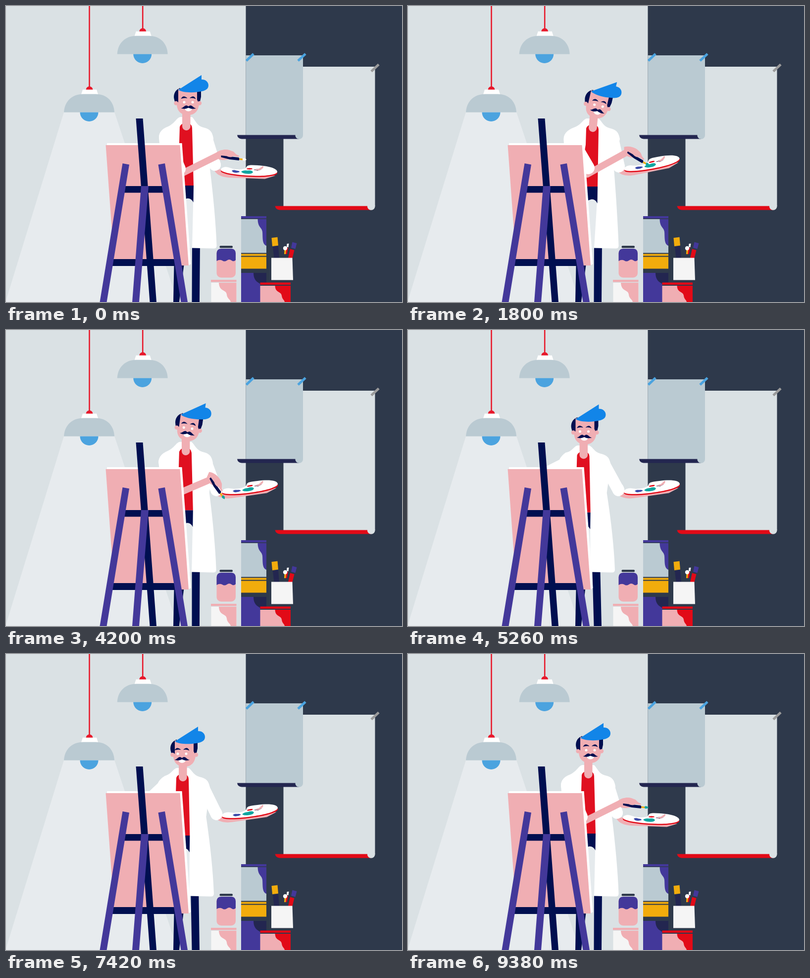
An HTML page for the animation above (9.4 s loop, 800 by 600 pixels).

```html
<!DOCTYPE html>
<html lang="en">
<head>
<meta charset="utf-8">
<title>Painter in the studio</title>
<style>
  html, body { margin: 0; width: 100%; height: 100%; overflow: hidden; background: #dae1e4; }
  svg { display: block; width: 100vw; height: 100vh; }
  .wall { fill: #dae1e4 } .slate { fill: #2e394b } .steel { fill: #bacad2 }
  .navy { fill: #000f50 } .ink { fill: #232650 } .purple { fill: #43389a }
  .pink { fill: #f0aeb3 } .red { fill: #e20a17 } .shirt { fill: #e01020 }
  .white { fill: #fff } .paper { fill: #f5f5f5 } .yellow { fill: #f2ac0c }
  .sky { fill: #4ba3df } .beret { fill: #1285e8 } .teal { fill: #10a5a0 }
  .sleeve { stroke: #fff; stroke-linecap: round; fill: none }
  .skin { stroke: #f0aeb3; stroke-linecap: round; fill: none }
  .tape { stroke-width: 5; fill: none }
</style>
</head>
<body>
<svg viewBox="0 0 800 600" preserveAspectRatio="none">
  <defs>
    <g id="lamp">
      <path d="M168.5 -120V165" stroke="#e7182b" stroke-width="2.6"/>
      <path fill="#e7182b" d="M161.5 170a7 7 0 0 1 14 0z"/>
      <path class="white" d="M155 169.5H183L186 179H152z"/>
      <path class="steel" d="M117 215.5C118 193 134 178.500 156 178.5H181C203 178.5 218 193 219 215.5z"/>
      <path class="sky" d="M149.5 215.5a18.5 18.5 0 0 0 37 0z"/>
    </g>
    <path id="plate" d="M434 332C434 328 442 325 449 327C462 332 477 333 485 328C487 323 490 322.5 497 322.5C530 323 548 329 548 336C548 342 525 345 500 344C460 343 434 337 434 332z"/>
  </defs>

  <!-- room -->
  <path class="wall" d="M0 0H800V600H0z"/>
  <path class="slate" d="M484.5 0H800V600H484.5z"/>
  <path fill="#e7ebee" d="M117 215H219L347 600H-1z"/>
  <use href="#lamp"/>
  <use href="#lamp" x="107.7" y="-118"/>

  <path class="wall" d="M560.5 123H745.5V406H560.5z"/>
  <path class="red" d="M543.5 405.5H738V413.5H553Q545 413 543.5 405.5z"/>
  <circle class="wall" cx="737.7" cy="406" r="7.8"/>
  <path class="steel" d="M484.5 100H600V262H484.5z"/>
  <path class="ink" d="M467 261.5H592V269.5H476Q468 269 467 261.5z"/>
  <circle class="steel" cx="592.2" cy="262" r="7.8"/>
  <path class="tape" stroke="#4ba3df" d="M485.5 111L500 97M590 111L605 97"/>
  <path class="tape" stroke="#9b9b9b" d="M738 132.5L753 118.5"/>

  <!-- painter -->
  <path id="legs" class="navy"/>
  <path id="coat" class="white"/>
  <path id="gap" fill="#e5eaed"/>
  <path id="pants" class="navy"/>
  <path id="shirt" class="shirt"/>
  <path id="neck" class="skin" stroke-width="16.5"/>
  <g id="head">
    <path class="navy" d="M352 166C341 170 338 180 339.5 188L342 198L350 197zM384 170H394V184L391 198L384 192z"/>
    <circle class="pink" cx="343.5" cy="197" r="4.2"/>
    <circle class="pink" cx="391" cy="197" r="4.2"/>
    <path class="pink" d="M348 168H386V190L390 198C389 214 380 221 368 221C354 221 346 214 345 200L348 194z"/>
    <g id="face">
      <path class="navy" d="M353.5 188Q358 179 366.5 187Q360 185.5 353.5 188zM371 187Q379 179 383.5 188.5Q377 185.5 371 187z"/>
      <circle class="white" cx="360" cy="195" r="2.5"/>
      <circle class="white" cx="377" cy="195" r="2.5"/>
      <path class="white" d="M361 207H376.5Q375 213.5 368.5 213.5Q362 213.5 361 207z"/>
      <path class="navy" d="M353.5 207C358 207 360 201.5 365 201.5L368.5 203.5L372 201.5C377 201.5 379 207 384 207.5C378 209.5 372 208.5 368.5 206C365 208.5 359 209.5 353.5 207z"/>
    </g>
    <path class="beret" d="M395 140L348 170C356 175 372 176 385 174.5C400 173 409 170 409 161C409 153 402 148.5 395 149z"/>
  </g>
  <path id="sleeveR" class="sleeve" stroke-width="24"/>
  <path id="under" class="pink" d="M421 333C425 343 440 348 455 348L523 350.5L544 344L500 338L434 331z"/>
  <path id="cuffR" class="sleeve" stroke-width="24"/>
  <g id="palette">
    <use href="#plate" y="2.5" class="red"/>
    <use href="#plate" class="white"/>
    <ellipse class="red" cx="492" cy="330" rx="6" ry="1.5"/>
    <path fill="#3a49a8" d="M456 334Q460 331.5 465 333.5Q472 334 472 336.5Q466 339 459 337z"/>
    <path class="teal" d="M475 336Q479 332.5 487 333.5Q498 332 499 337Q496 341 487 340Q479 340 475 336z"/>
    <path class="ink" d="M500 332L507 330.5L516 331.5L508 334z"/>
    <path class="pink" d="M502 331.5C510 331 514 328 518 325C522 324 520 329 516 331C511 334 505 334 502 331.5z"/>
  </g>
  <path id="forearm" class="skin" stroke-width="13.5"/>
  <path id="sleeveL" class="sleeve" stroke-width="26"/>
  <g id="hand">
    <path class="pink" d="M424 298C432 291 444 290 451 292L459 295C463 298 464 301 470 303C473 305 470 307 465 305L457 304C452 312 442 314 430 311z"/>
    <path class="navy" d="M434.5 303L452 305L470 307Q473 310 470.5 313L452 311L434.5 306.5z"/>
    <path class="yellow" d="M471.5 308.5L478.5 309.5L478 312.5L471.5 312z"/>
    <path id="tip" d="M478 309Q482 306.5 486 311.5Q481 315 478 312.5z"/>
    <path class="pink" d="M447 300L459 300Q462 304 456 306Q449 307 445 303z"/>
  </g>

  <!-- easel -->
  <path class="white" d="M204 278H355.5L373.5 523L368 526L219 520z"/>
  <path class="pink" d="M201.5 282H351.5L369 526H219z"/>
  <path class="navy" d="M238 365H320V378.5H238zM212 513H345V527H212zM262.5 228H276.5L304 600H290.5z"/>
  <path class="purple" d="M235.5 319L249 321.5L203.5 600H189.5zM307.5 321.5L321 319L367 600H353.5zM273 365H288L269 600H255z"/>

  <!-- cans and jar -->
  <rect class="slate" x="431.5" y="486" width="26.5" height="4.5" rx="2"/>
  <rect class="pink" x="425.5" y="492" width="38.5" height="58.5" rx="9"/>
  <path class="purple" d="M425.5 501Q426 492 435 492H455Q463.5 492 464 501V515Q460 519 456 516Q451 512 446 516Q441 519 437 516Q431 513 425.5 517z"/>
  <path class="pink" d="M414 555H465.5V559.5H414z"/>
  <path class="paper" d="M414.5 561H465.5V600H414.5z"/>
  <path class="pink" d="M430 561H465.5V600H454C453 594 447 594 446 585C445 574 431 580 430 561z"/>

  <path class="slate" d="M475 426H526V600H475z"/>
  <path class="purple" d="M475 426H526V430.5H475zM475 541H514V600H475z"/>
  <path class="steel" d="M475 432H526V500.5H475z"/>
  <path class="purple" d="M508.5 432H526V486C517 482 519 470 518 458C517 448 509 450 508.5 432z"/>
  <path class="yellow" d="M475 502.5H526V506.5H475zM475 508.5H526V532.5H475z"/>
  <path class="ink" d="M500 541H526V564H514C510 560 500 558 500 541z"/>
  <path class="red" d="M513.5 560.5H575V565H513.5z"/>
  <path class="slate" d="M513.5 565H575V567H513.5z"/>
  <path class="pink" d="M513.5 567H575V600H513.5z"/>
  <path class="red" d="M543.5 567H575V600H563C562 595 558 595 557 587C556 578 544 582 543.5 567z"/>

  <path class="yellow" d="M536.5 470L548.5 468.5L550 485.5L538 487z"/>
  <path class="ink" d="M539 488L550 486.5L552 511H541.5z"/>
  <path class="white" d="M567.5 482L571.5 481.5L570.5 489L567 488.5z"/>
  <path class="red" d="M566 490H570L567.5 503H564zM574 492.5L582.5 495L578.5 511H570z"/>
  <path class="yellow" d="M562.5 494H566L565 503H562z"/>
  <circle class="white" cx="564" cy="491" r="4.2"/>
  <path class="purple" d="M578.5 478.5L587.5 481L584.5 492.5L576 490z"/>
  <path class="paper" d="M536 510.5H578.5L580 555.5H536z"/>
</svg>

<script>
const LOOP = 9400;
const part = id => document.getElementById(id);
const draw = (id, d) => part(id).setAttribute('d', d);
const place = (id, v) => part(id).setAttribute('transform', v);

// x, y: shoulders; look, nod: head shift and rotation; face: features' shift;
// tilt: palette angle; cuff, hand, grip: painting arm; stir: brush swing.
const rest = { x: 0, y: 0, look: 0, nod: 0, face: 0, tilt: 0,
  cuffX: 350, cuffY: 330, handX: 445, handY: 302, grip: 0, stir: 0 };
const mix = { x: 9, y: 3, look: 6.5, nod: 13, face: 1, tilt: -13.5,
  cuffX: 364, cuffY: 328, handX: 454, handY: 298, grip: 24, stir: 1 };
const dab = { ...mix, x: 1, y: 0, look: 3, nod: 10, face: -2, tilt: -10.5,
  cuffX: 366, cuffY: 325, handX: 461, grip: 25 };
const paint = { ...rest, x: -9.5, y: 9, face: -3, tilt: -10.5,
  cuffX: 261, cuffY: 300, handX: 270, handY: 340, grip: 140 };
const retouch = { ...paint, x: -7, y: 6, face: -6, cuffX: 275, cuffY: 310 };
const lean = { ...retouch, x: 13, tilt: -17.5, cuffX: 300, cuffY: 325, handX: 312, grip: 100 };

const timeline = [
  [0, rest], [120, rest], [940, mix], [1950, mix], [3200, dab], [3800, dab],
  [5200, paint], [5700, paint], [6900, retouch], [7420, retouch],
  [8100, lean], [8250, lean], [9150, rest], [LOOP, rest]
];

const ease = k => k * k * (3 - 2 * k);

function poseAt(t) {
  const i = timeline.findIndex(([time]) => time > t);
  const [t0, a] = timeline[i - 1], [t1, b] = timeline[i];
  const k = ease((t - t0) / (t1 - t0));
  return Object.fromEntries(Object.keys(a).map(key => [key, a[key] + (b[key] - a[key]) * k]));
}

function render(t) {
  const { x, y, look, nod, face, tilt, cuffX, cuffY, handX, handY, grip, stir } = poseAt(t);

  // The lower body trails the shoulders.
  const hem = Math.min(0, x * .8);
  const waist = x * .45 + hem * .8;
  const belt = 364 + y * .65;
  const p = (a, b) => `${a + x} ${b + y} `;
  const s = (a, b) => `${a + x} ${b + y * .5} `;

  draw('legs', `M${360 + waist} 380L${376 + hem / 2} 395L350 600H338L340 500z
    M${376 + hem / 2} 480H${392 + hem / 2}L391 600H375.5z`);
  draw('coat', `M${p(352, 225)}C${p(344, 227)}${p(342, 237)}${s(328, 244)}
    Q${308 + x * .6} ${251 + y} ${309 + x * .6} ${268 + y}L330 480L${376 + hem} 490.5
    L${419 + hem} 491.5Q${426 + hem} 492 ${425.5 + hem} 485
    Q${423 + hem} 420 ${412 + waist} 330L${s(419, 268)}C${s(416, 252)}${s(410, 249)}${s(398, 246)}
    C${s(386, 243)}${s(384, 234)}${p(376, 225)}z`);
  draw('gap', `M340 ${belt + 20}H${378.5 + waist}L${376 + hem} 491H340z`);
  draw('pants', `M345 ${belt}H${379 + waist}L${378.5 + waist} ${belt + 34}
    Q${374 + waist} ${belt + 25} ${366 + waist} ${belt + 26}L345 ${belt + 34}z`);
  draw('shirt', `M${p(351, 245)}Q${p(354, 237)}${p(364, 237)}Q${p(375, 237)}${p(376, 247)}
    L${379 + waist} ${belt}H345L${p(350, 278)}z`);

  const headX = x + look, headY = y * 1.2 + nod * .25;
  draw('neck', `M${364.3 + headX - nod * .31} ${213 + headY}L${p(364.3, 244)}`);
  place('head', `translate(${headX} ${headY}) rotate(${nod} 368.5 195)`);
  place('face', `translate(${face} 0)`);

  const wristX = 422 - tilt * .3, wristY = 322 - tilt * .25;
  draw('sleeveR', `M${s(404, 264)}L${wristX} ${wristY}`);
  draw('cuffR', `M${wristX - 1} ${wristY - 3}L${wristX} ${wristY}`);
  const lift = Math.min(1, -tilt / 10);
  const held = `translate(${1.5 * lift} ${-14 * lift}) rotate(${tilt} 491 334)`;
  place('under', held);
  place('palette', held);

  const swing = stir * Math.sin((t - 1800) / 365 * 2 * Math.PI);
  const gx = handX + 4 * swing, gy = handY + 1.2 * swing;
  draw('forearm', `M${cuffX - 2} ${cuffY + 13}L${gx - 15} ${gy}`);
  draw('sleeveL', `M${322 + x * .8} ${266 + y * .8}L${cuffX} ${cuffY}`);
  place('hand', `translate(${gx - 445} ${gy - 302}) rotate(${grip} 445 302)`);
  part('tip').setAttribute('class', t < 900 ? 'white' : 'teal');
}

const start = performance.now();
function tick() {
  render((performance.now() - start) % LOOP);
  requestAnimationFrame(tick);
}
tick();
</script>
</body>
</html>
```
